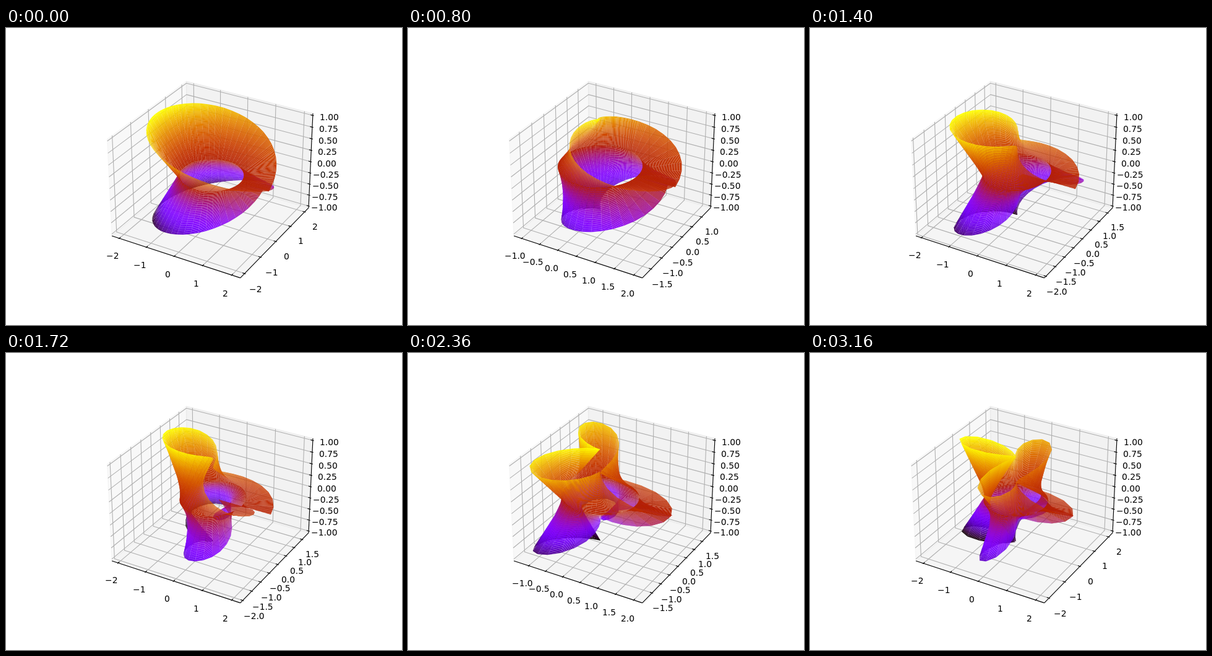
These frames come from a looping animation (640 px wide and 480 px high, 3200 ms). An HTML page with a canvas:

```html
<!DOCTYPE html>
<html lang="en">
<head>
<meta charset="utf-8">
<title>Twisting strip</title>
<style>
  html, body { margin: 0; width: 100%; height: 100%; overflow: hidden; background: #fff; }
  canvas { display: block; width: 640px; height: 480px; }
</style>
</head>
<body>
<canvas id="stage" width="640" height="480"></canvas>
<script>
const ctx = document.getElementById('stage').getContext('2d', { willReadFrequently: true });

const STEP_MS = 40, STEPS = 80;
const TURNS = 99, RINGS = 49;        // mesh cells around and across the strip
const PT = 100 / 72;                 // points to pixels
const LO = -1 / 48, HI = 49 / 48;    // drawn box, as fractions of the axis limits
const LABEL_GAP = 0.0864;

// Camera: elevation 30, azimuth -60, distance 10
const UNIT = 1.8294640721620434 / Math.sqrt(41);
const C = Math.sqrt(3) / 2;

// Takes fractions of the axis limits, gives screen x, screen y and depth
function project([fx, fy, fz]) {
  const x = (fx - 0.5) * 4 * UNIT, y = (fy - 0.5) * 4 * UNIT, z = (fz - 0.5) * 3 * UNIT;
  const depth = 10 - (C / 2 * x - 0.75 * y + 0.5 * z);
  const u = (C * x + 0.5 * y) / depth;
  const v = (-0.25 * x + C / 2 * y + C * z) / depth;
  const k = 369.6 / 0.185;
  return [143.2 + (u + 0.095) * k, 427.2 - (v + 0.095) * k, depth];
}

function trace(points) {
  ctx.beginPath();
  points.forEach(([x, y], i) => i ? ctx.lineTo(x, y) : ctx.moveTo(x, y));
}

function line(points, color, width = 0.8 * PT) {
  trace(points.map(project));
  ctx.strokeStyle = color;
  ctx.lineWidth = width;
  ctx.stroke();
}

function pane(points, level) {
  trace(points.map(project));
  ctx.closePath();
  ctx.fillStyle = ctx.strokeStyle = `rgba(${level},${level},${level},0.5)`;
  ctx.lineWidth = PT;
  ctx.fill();
  ctx.stroke();
}

function label(at, text) {
  const [x, y] = project(at);
  ctx.fillStyle = '#000';
  ctx.fillText(text, Math.round(x - ctx.measureText(text).width / 2), Math.round(y + 11.2));
}

function heat(t) {
  const b = Math.max(0, Math.sin(2 * Math.PI * t));
  return `rgb(${[Math.sqrt(t), t ** 3, b].map(c => Math.round(c * 255))})`;
}

function ticks([lo, hi], step) {
  const list = [];
  for (let n = Math.ceil(lo / step - 1e-6); n * step <= hi + 1e-6; n++) list.push(n * step);
  return list;
}

const format = (v, digits) => (v < 0 ? '\u2212' : '') + Math.abs(v).toFixed(digits);

function surface(twist) {
  const rows = [];
  for (let i = 0; i <= TURNS; i++) {
    const a = 4 * Math.PI * i / TURNS, row = [];
    for (let j = 0; j <= RINGS; j++) {
      const w = j / RINGS, r = 1 + w * Math.cos(twist * a);
      row.push([r * Math.cos(a), r * Math.sin(a), w * Math.sin(a / 2)]);
    }
    rows.push(row);
  }
  return rows;
}

function limits(rows, axis) {
  let lo = Infinity, hi = -Infinity;
  for (const row of rows) for (const p of row) {
    lo = Math.min(lo, p[axis]);
    hi = Math.max(hi, p[axis]);
  }
  const pad = (hi - lo) * 0.05;
  return [lo - pad, hi + pad];
}

function drawAxis(lim, step, digits, edge, grid, tickAxis, labelAt) {
  line([edge(LO), edge(HI)], '#000');
  const marks = ticks(lim, step).map(v => [v, (v - lim[0]) / (lim[1] - lim[0])]);
  for (const [, f] of marks) line(grid(f), '#b0b0b0');
  for (const [v, f] of marks) {
    const outer = edge(f), inner = edge(f);
    const out = outer[tickAxis] > 0.5 ? 1 : -1;
    outer[tickAxis] += out * 0.1 / 12;
    inner[tickAxis] -= out * 0.2 / 12;
    line([outer, inner], '#000');
    label(labelAt(f), format(v, digits));
  }
}

function drawBox(xLim, yLim) {
  pane([[LO, LO, LO], [LO, HI, LO], [LO, HI, HI], [LO, LO, HI]], 242);
  pane([[LO, HI, LO], [HI, HI, LO], [HI, HI, HI], [LO, HI, HI]], 230);
  pane([[LO, LO, LO], [HI, LO, LO], [HI, HI, LO], [LO, HI, LO]], 236);

  const near = LO - LABEL_GAP, far = HI + LABEL_GAP;
  const stepFor = ([lo, hi]) => (hi - lo) / 8 <= 0.5 ? 0.5 : 1;
  const xStep = stepFor(xLim), yStep = stepFor(yLim);
  drawAxis(xLim, xStep, xStep < 1 ? 1 : 0,
    f => [f, LO, LO], f => [[f, LO, LO], [f, HI, LO], [f, HI, HI]], 1, f => [f, near, near]);
  drawAxis(yLim, yStep, yStep < 1 ? 1 : 0,
    f => [HI, f, LO], f => [[HI, f, LO], [LO, f, LO], [LO, f, HI]], 0, f => [far, f, near]);
  drawAxis([-1, 1], 0.25, 2,
    f => [HI, HI, f], f => [[LO, LO, f], [LO, HI, f], [HI, HI, f]], 0, f => [far, far, f]);
}

function drawSurface(rows, xLim, yLim) {
  const place = ([x, y, z]) => project([
    (x - xLim[0]) / (xLim[1] - xLim[0]),
    (y - yLim[0]) / (yLim[1] - yLim[0]),
    (z + 1) / 2
  ]);
  const screen = rows.map(row => row.map(place));
  const cells = [];
  let low = Infinity, high = -Infinity;
  for (let i = 0; i < TURNS; i++) for (let j = 0; j < RINGS; j++) {
    const corners = g => [g[i][j], g[i + 1][j], g[i + 1][j + 1], g[i][j + 1]];
    const points = corners(screen);
    const z = corners(rows).reduce((s, p) => s + p[2], 0) / 4;
    const depth = points.reduce((s, p) => s + p[2], 0);
    low = Math.min(low, z);
    high = Math.max(high, z);
    cells.push({ points, z, depth });
  }
  cells.sort((a, b) => b.depth - a.depth);
  for (const { points, z } of cells) {
    trace(points);
    ctx.closePath();
    ctx.fillStyle = heat((z - low) / (high - low));
    ctx.fill();
  }
}

function draw(step) {
  ctx.fillStyle = '#fff';
  ctx.fillRect(0, 0, 640, 480);
  ctx.font = `${10 * PT}px "DejaVu Sans", sans-serif`;
  ctx.lineJoin = 'round';
  ctx.lineCap = 'butt';
  const rows = surface((step + 1) / 20);
  const xLim = limits(rows, 0), yLim = limits(rows, 1);
  drawBox(xLim, yLim);
  drawSurface(rows, xLim, yLim);
}

const start = performance.now();
let shown = -1;
function tick() {
  const step = Math.floor((performance.now() - start) / STEP_MS) % STEPS;
  if (step !== shown) draw(shown = step);
  requestAnimationFrame(tick);
}
tick();
</script>
</body>
</html>
```
